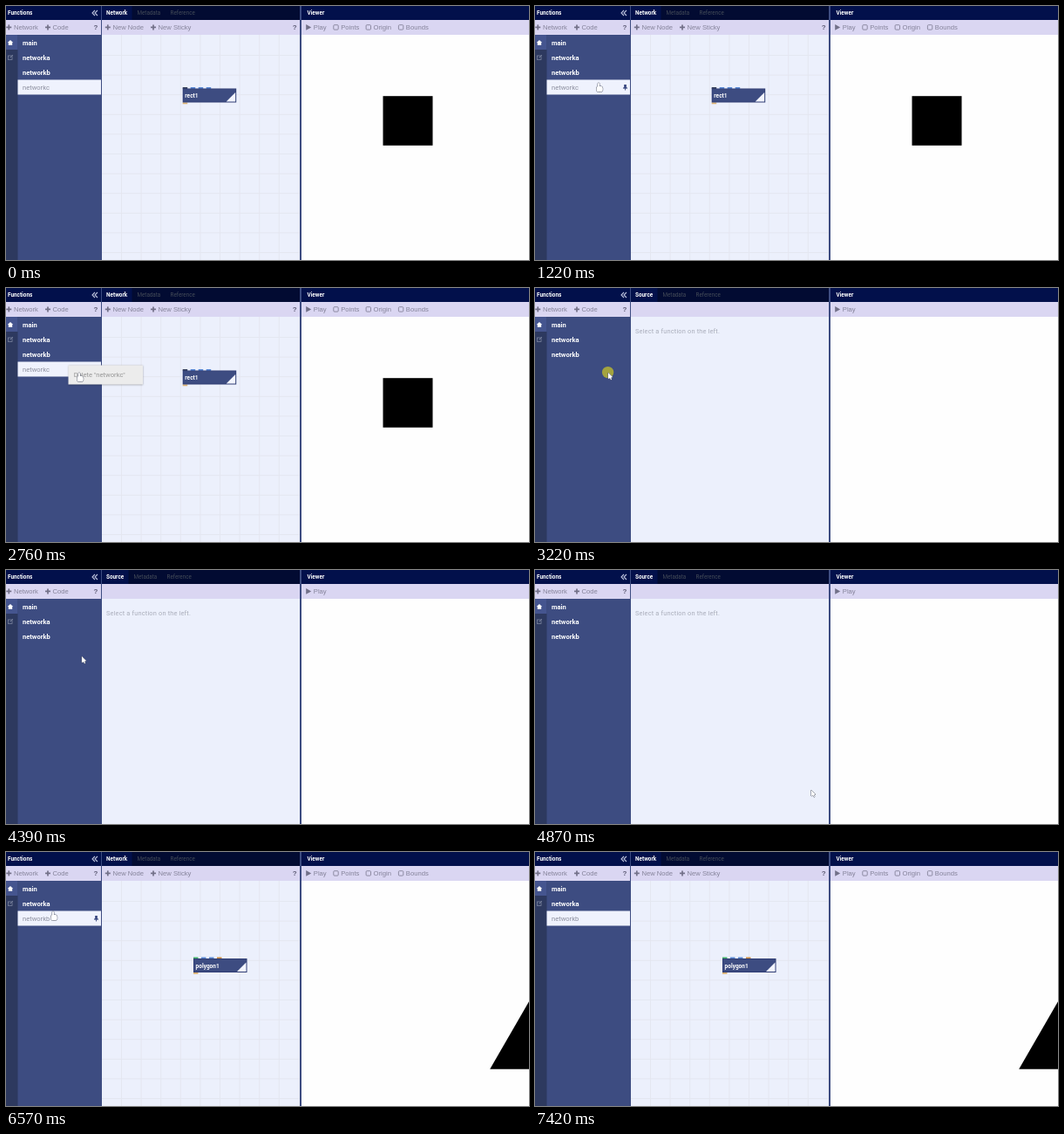
An HTML page with a canvas for the animation above (8.82 s loop, 600x291 px).

```html
<!DOCTYPE html>
<html lang="en">
<head>
<meta charset="utf-8">
<title>Deleting a function</title>
<style>
  html, body { margin: 0; width: 100%; height: 100%; overflow: hidden; background: #fff; }
  canvas { display: block; }
</style>
</head>
<body>
<canvas id="stage" width="600" height="291"></canvas>
<script>
const ctx = document.getElementById('stage').getContext('2d');
const WIDTH = 600, HEIGHT = 291, HEADER = 16, BODY = 33;
const EDITOR = 110, SPLIT = 337, VIEWER = 339;
const ROW = 17, LIST_TOP = 33.5, STRIP = 13.5;
const NAVY = '#02104b', BLUE = '#3d4c81', BAR = '#dad6f2', GREY = '#85839a', ICON = '#727088';
const UI = 'Roboto, sans-serif';
const TOOL = '"Liberation Sans", Arial, sans-serif';

// Timeline in ms
const LOOP = 8820, STEP = 75;
const SHOWN = 920, MENU = 2070, DELETED = 3220, SELECTED = 6570, HIDDEN = 7420;
const clicks = [[MENU - 160, MENU], [DELETED, DELETED + 70], [SELECTED - 150, SELECTED]];
const start = { x: 120, y: 233 };
const stops = [
  { at: SHOWN, steps: 5, x: 73, y: 88 },
  { at: 1450, steps: 1, x: 72, y: 88 },
  { at: 2530, steps: 4, x: 84, y: 97 },
  { at: 4390, steps: 7, x: 317, y: 252 },
  { at: 5560, steps: 6, x: 79, y: 107 },
  { at: 6020, steps: 5, x: 54, y: 68 },
  { at: 7190, steps: 4, x: 374, y: 309 },
];

const within = (v, a, b) => v >= a && v < b;
const ease = p => p < .5 ? 4 * p ** 3 : 1 - 4 * (1 - p) ** 3;

function pointerAt(t) {
  const i = stops.findLastIndex(s => t >= s.at);
  const from = stops[i - 1] ?? start;
  const to = stops[i];
  const done = Math.floor((t - to.at) / STEP + .05) + 1;
  const p = ease(Math.min(1, done / to.steps));
  const mix = axis => Math.round(from[axis] + (to[axis] - from[axis]) * p);
  return { x: mix('x'), y: mix('y') };
}

function rect(x, y, w, h, color) {
  ctx.fillStyle = color;
  ctx.fillRect(x, y, w, h);
}

function text(str, x, y, size, color, font = UI, weight = 'normal') {
  ctx.font = `${weight} ${size}px ${font}`;
  ctx.fillStyle = color;
  ctx.fillText(str, x, y);
  return ctx.measureText(str).width;
}

function trace(points) {
  ctx.beginPath();
  points.forEach(([x, y]) => ctx.lineTo(x, y));
}

function fill(color, ...points) {
  trace(points);
  ctx.fillStyle = color;
  ctx.fill();
}

function line(color, width, ...points) {
  trace(points);
  ctx.strokeStyle = color;
  ctx.lineWidth = width;
  ctx.stroke();
}

const title = (str, x) => text(str, x, 10, 6.4, '#fff', UI, 'bold');
const tool = (str, x) => text(str, x, 27.2, 7.65, GREY, TOOL);
const help = x => text('?', x, 27.2, 8, '#62607a', TOOL, 'bold');

function addButton(str, x) {
  const cy = 24.4;
  line(ICON, 1.7, [x, cy], [x + 6, cy]);
  line(ICON, 1.7, [x + 3, cy - 3], [x + 3, cy + 3]);
  tool(str, x + 8.6);
}

function checkbox(str, x) {
  ctx.strokeStyle = GREY;
  ctx.lineWidth = .9;
  ctx.beginPath();
  ctx.roundRect(x, 21.7, 5.4, 5.4, 1);
  ctx.stroke();
  tool(str, x + 8.4);
}

function pane(x, right, header, body) {
  rect(x, 0, right - x, HEADER, header);
  rect(x, HEADER, right - x, BODY - HEADER, BAR);
  rect(x, BODY, right - x, HEIGHT - BODY, body);
}

function pin(x, y, color) {
  line(color, 2.6, [x, y], [x, y + 4]);
  line(color, 1.2, [x - 2.5, y + 4], [x + 2.5, y + 4]);
  line(color, .9, [x, y + 4], [x, y + 6.5]);
}

function functionList(items, selected, hovered) {
  pane(0, EDITOR - 1, NAVY, BLUE);
  title('Functions', 2);
  for (const x of [102, 105]) line('#bcc2dc', 1.1, [x, 5], [x - 3, 8], [x, 11]);
  addButton('Network', .3);
  addButton('Code', 45);
  help(100.6);

  rect(0, BODY, STRIP, HEIGHT - BODY, '#2d395f');
  rect(0, BODY, STRIP, ROW, '#45558f');
  fill('#fff', [1.8, 42], [5, 39], [8.2, 42]);
  rect(2.8, 42, 4.4, 2.8, '#fff');
  ctx.strokeStyle = '#7b849f';
  ctx.lineWidth = .8;
  ctx.strokeRect(2.5, 57, 4.5, 4.5);
  line('#7b849f', .9, [4.5, 59.5], [8, 56]);

  items.forEach((name, i) => {
    const y = LIST_TOP + ROW * i;
    const on = i === selected;
    if (on) rect(STRIP, y, EDITOR - 1 - STRIP, ROW, '#eff2fd');
    text(name, 19, y + 11.3, 7.55, on ? '#8b8e9d' : '#fff', UI, on ? 'normal' : 'bold');
    if (i === hovered) pin(103.5, y + 5.5, on ? '#34437c' : '#fff');
  });
  rect(EDITOR - 1, 0, 1, HEIGHT, BLUE);
}

function tabs(names) {
  let x = 115;
  names.forEach((name, i) => {
    if (i) {
      x += text(name, x, 10, 6.3, '#444b58') + 11.3;
      return;
    }
    ctx.font = `bold 6.5px ${UI}`;
    const width = ctx.measureText(name).width;
    rect(EDITOR, 0, width + 10, HEADER, NAVY);
    x += title(name, x) + 11.3;
  });
}

function node(name, x, y, ports) {
  ports.forEach((color, i) => rect(x + 9 * i, y - 1.5, 5.5, 2, color));
  rect(x, y + 16, 5.5, 1.8, '#dcb170');
  rect(x, y, 61.5, 16, '#2c3970');
  rect(x + .7, y + .7, 60, 14.4, BLUE);
  text(name, x + 2.6, y + 10.8, 6.5, '#fff', UI, 'bold');
  fill('#f3f5ff', [x + 50, y + 15], [x + 60.5, y + 4.5], [x + 60.5, y + 15]);
}

function editor(scene) {
  pane(EDITOR, SPLIT, '#020b32', '#ecf0fc');
  tabs([scene === 'empty' ? 'Source' : 'Network', 'Metadata', 'Reference']);
  if (scene === 'empty') {
    ctx.letterSpacing = '.17px';
    text('Select a function on the left.', 115, 52.3, 7.4, '#a9adba');
    ctx.letterSpacing = '0px';
    return;
  }
  addButton('New Node', 113.8);
  addButton('New Sticky', 166);
  help(328.7);
  const cell = 22.6;
  for (let x = 132; x < SPLIT; x += cell) rect(x, BODY, 1, HEIGHT - BODY, '#e4e7f1');
  for (let y = 56; y < HEIGHT; y += cell) rect(EDITOR, y, SPLIT - EDITOR, 1, '#e4e7f1');

  const port = '#5a8ad6';
  if (scene === 'rect') node('rect1', 202.7, 94.5, ['#39435f', port, port, port]);
  else node('polygon1', 215, 122, ['#45b56a', port, port, '#d08c3c']);
}

function viewer(scene) {
  rect(SPLIT, 0, VIEWER - SPLIT, HEIGHT, BLUE);
  pane(VIEWER, WIDTH, NAVY, '#fefefe');
  title('Viewer', 345.5);
  fill(ICON, [344.2, 21], [350.2, 24.4], [344.2, 27.8]);
  tool('Play', 352.8);
  if (scene === 'empty') return;
  ['Points', 'Origin', 'Bounds'].forEach((name, i) => checkbox(name, 375.8 + 37.3 * i));
  if (scene === 'rect') rect(432.5, 103.2, 57, 56.6, '#000');
  else fill('#000', [555.2, 248.8], [WIDTH, 171.2], [WIDTH, 248.8]);
}

function menu() {
  ctx.save();
  ctx.shadowColor = 'rgba(0,0,0,.35)';
  ctx.shadowBlur = 2;
  ctx.shadowOffsetY = .5;
  rect(71.5, 88.5, 85.5, 22, '#ececec');
  ctx.restore();
  text('Delete "networkc"', 77.7, 102, 7.6, '#969696');
}

function pointer(hand) {
  const path = new Path2D();
  if (hand) {
    path.roundRect(-.9, 0, 1.8, 7, .9);
    path.roundRect(-2.5, 4, 7.2, 6.3, 2);
  } else {
    path.moveTo(0, 0);
    path.lineTo(0, 7);
    path.lineTo(5, 5);
    path.closePath();
    path.moveTo(1.6, 5);
    path.lineTo(3, 8.2);
    path.lineTo(4, 7.7);
    path.lineTo(2.6, 4.6);
    path.closePath();
  }
  ctx.strokeStyle = '#555a6b';
  ctx.lineWidth = 1;
  ctx.lineJoin = 'round';
  ctx.stroke(path);
  ctx.fillStyle = '#fff';
  ctx.fill(path);
}

function draw(t) {
  const scene = t < DELETED ? 'rect' : t < SELECTED ? 'empty' : 'polygon';
  const items = ['main', 'networka', 'networkb'];
  if (scene === 'rect') items.push('networkc');
  const selected = scene === 'empty' ? -1 : items.length - 1;
  const menuOpen = within(t, MENU, DELETED);
  const pos = within(t, SHOWN, HIDDEN) ? pointerAt(t) : null;

  const overList = pos && !menuOpen && within(pos.x, STRIP, EDITOR - 1);
  const hovered = overList ? Math.floor((pos.y - LIST_TOP) / ROW) : -1;

  functionList(items, selected, hovered);
  editor(scene);
  viewer(scene);
  if (menuOpen) menu();
  if (!pos) return;

  ctx.save();
  ctx.translate(pos.x, pos.y);
  if (clicks.some(([a, b]) => within(t, a, b))) {
    ctx.fillStyle = 'rgba(232,222,20,.6)';
    ctx.beginPath();
    ctx.arc(-.4, -.4, 6.7, 0, 2 * Math.PI);
    ctx.fill();
  }
  pointer(menuOpen || within(hovered, 0, items.length));
  ctx.restore();
}

function frame() {
  draw(performance.now() % LOOP);
  requestAnimationFrame(frame);
}
frame();
</script>
</body>
</html>
```
